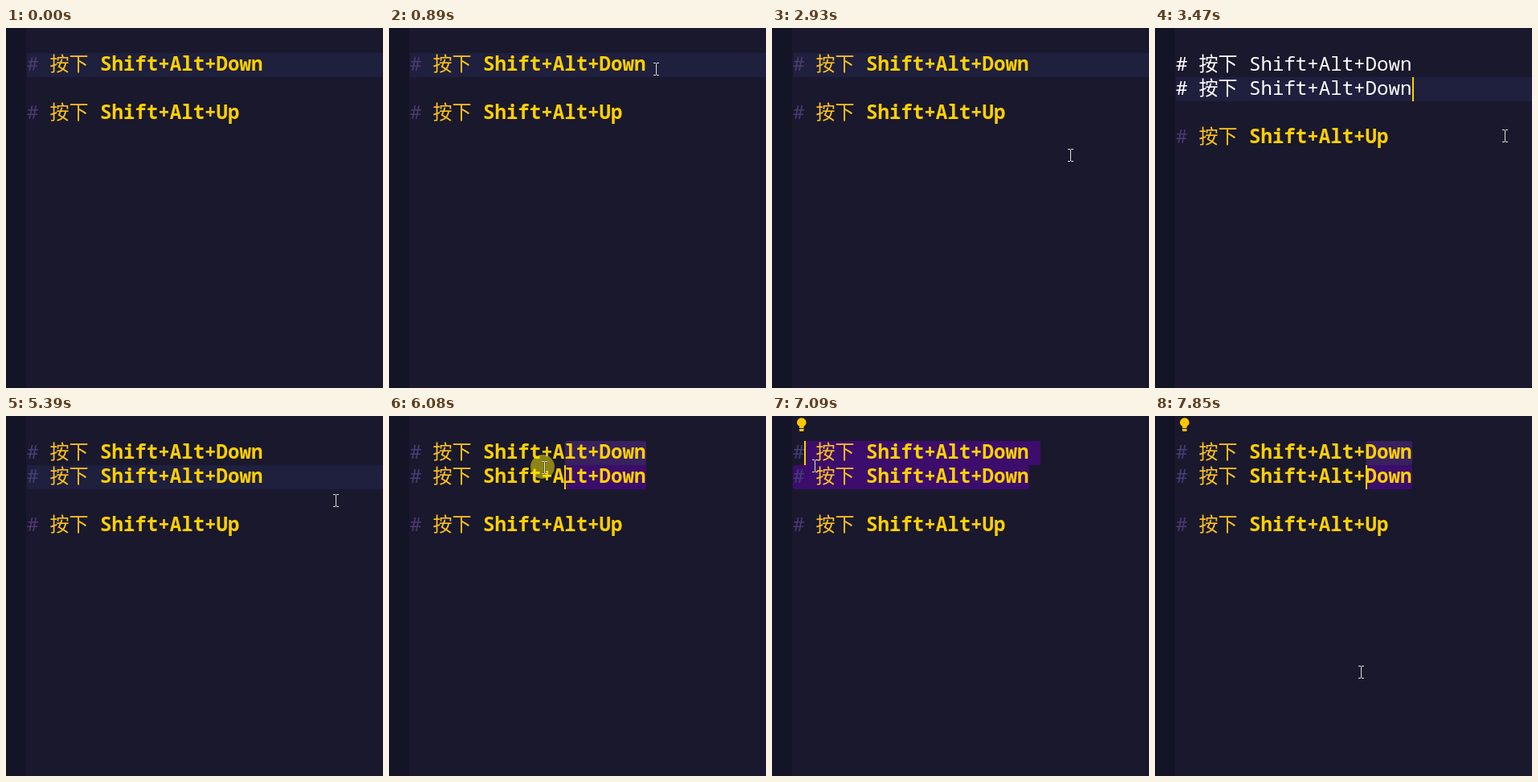
An HTML page that plays this animation: 469 by 447 pixels, repeating every 8000 ms.

```html
<!DOCTYPE html>
<html lang="zh">
<head>
<meta charset="utf-8">
<style>
html, body { margin: 0; width: 100%; height: 100%; overflow: hidden; background: #1a182d; }
svg { display: block; width: 469px; height: 447px; }
text { font: 24.1px "Noto Sans Mono", "Noto Sans CJK SC", "Noto Sans CJK", monospace; fill: #fff; }
.rich .han { font-weight: 500; fill: #ffc41c; }
.rich .key { font-weight: 700; fill: #ffd000; }
</style>
</head>
<body>
<svg id="stage" viewBox="0 0 469 447"></svg>
<script>
const LOOP = 8000, LEFT = 26, END = 320, CELL = 14.46;
const COPY = 3400, RECOLOR = 3540, PRESS = 5600, RELEASE = 6940;
const stage = document.getElementById('stage');

const smooth = k => k * k * (3 - 2 * k);
const easeOut = k => 1 - (1 - k) ** 3;

// Pointer strokes; each starts where the last one ended, "via" bends it
const strokes = [
  { from: 190, to: 960, end: [332, 51], via: [484, 285], ease: easeOut },
  { from: 1370, to: 1710, end: [332, 172] },
  { from: 2740, to: 3200, end: [435, 134] },
  { from: 5250, to: 5600, end: [325, 76], via: [410, 86] },
  { from: 5600, to: 6600, end: [45, 38], via: [185, 68] },
  { from: 6600, to: 6830, end: [32, 35] },
  { from: 6960, to: 7650, end: [256, 318] }
];

// Each caret blink: start and half period
const blinks = [[1225, 485], [3536, 464], [PRESS, 2000], [6930, 460]];

const columns = [LEFT, LEFT + CELL, 55, 79];
for (let i = 15; i >= 0; i--) columns.push(END - i * CELL);

const rowTop = row => 31 + 30 * row;
const rect = (x, y, w, h, fill, r = 0) =>
  `<rect x="${x}" y="${y}" width="${w}" height="${h}" rx="${r}" fill="${fill}"/>`;
const band = (x1, x2, row, fill) => rect(x1, rowTop(row), x2 - x1, 30, fill, 2.5);

function pointer(t) {
  let pos = [439, 434];
  for (const { from, to, end, via, ease = smooth } of strokes) {
    if (t < from) break;
    const k = ease(Math.min(1, (t - from) / (to - from)));
    pos = pos.map((a, i) => {
      const mid = via ? via[i] : (a + end[i]) / 2;
      return (1 - k) ** 2 * a + 2 * k * (1 - k) * mid + k * k * end[i];
    });
  }
  return pos;
}

function caretOn(t) {
  const last = blinks.filter(b => b[0] <= t).pop();
  return last && Math.floor((t - last[0]) / last[1]) % 2 === 0;
}

function caretAt(t) {
  if (t < PRESS) return [END, t < COPY ? 0 : 1];
  const [x, y] = pointer(t - 50);
  const near = columns.reduce((a, b) => Math.abs(b - x) < Math.abs(a - x) ? b : a);
  return [near, y < 61 ? 0 : 1];
}

function line(key, row, rich, hash) {
  return `<text y="${rowTop(row) + 22}" class="${rich ? 'rich' : ''}">` +
    `<tspan x="26" style="fill:${rich ? hash : '#fff'}">#</tspan>` +
    `<tspan class="han" x="54.5">按下</tspan>` +
    `<tspan class="key" x="117">Shift+Alt+${key}</tspan></text>`;
}

function selection(x, row) {
  const fill = '#3c0d6c';
  if (row === 0) return band(x, END + 14, 0, fill) + band(LEFT, END, 1, fill);
  return band(x, END, 0, '#37215f') + band(x, END, 1, fill);
}

function mouse(t) {
  const [x, y] = pointer(t).map(Math.round);
  const pressed = t >= 1230 && t < 1400 || t >= PRESS && t < RELEASE;
  const beam = 'd="M-3-7.5H0M1-7.5H4M.5-7V7M-3 7.5H0M1 7.5H4"';
  return (pressed ? `<circle cx="${x - 2}" cy="${y - 1}" r="15" fill="#fff000" opacity=".5"/>` : '') +
    `<g transform="translate(${x} ${y})" fill="none">` +
    `<path ${beam} stroke="#111" stroke-width="2" opacity=".5"/><path ${beam} stroke="#e4e4e4"/></g>`;
}

const bulb = '<path d="M34 15v-2.2C32 11.5 31 10 31 8a5.8 5.8 0 0 1 11.6 0c0 2-1 3.5-3 4.8V15z' +
  'M34 16h5.6v2q0 1-1 1h-3.6q-1 0-1-1z" fill="#ffc800"/>';

function draw(t) {
  const [x, row] = caretAt(t), copied = t >= COPY;
  const selecting = t >= PRESS && (row === 0 || x < END);
  const rich = t < COPY || t >= RECOLOR;
  const hash = copied ? '#413f76' : '#4b3b6e';

  let out = rect(0, 0, 469, 447, '#1a182d') + rect(0, 0, 25, 447, '#131527');
  out += selecting ? selection(x, row) : rect(LEFT, rowTop(row), 443, 30, '#1f1f3e');
  out += line('Down', 0, rich, hash);
  if (copied) out += line('Down', 1, rich, hash);
  out += line('Up', copied ? 3 : 2, true, '#4b3872');
  if (caretOn(t)) out += rect(Math.floor(x), rowTop(row), 2, 30, '#ffd000');
  if (t >= RELEASE) out += bulb;
  if (t >= 190) out += mouse(t);
  stage.innerHTML = out;
}

const start = performance.now();
function tick() {
  draw((performance.now() - start) % LOOP);
  requestAnimationFrame(tick);
}
tick();
</script>
</body>
</html>
```
